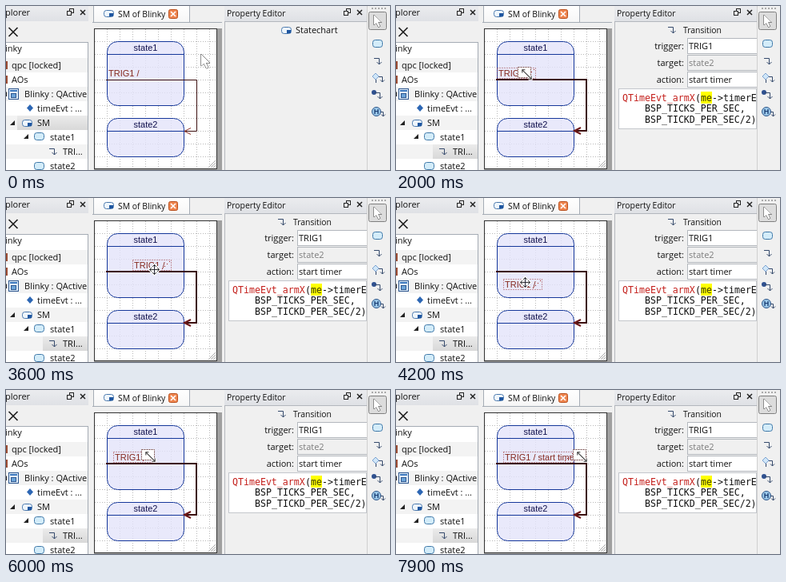
An HTML page with a canvas for the animation above (8 s loop, 480x205 px).

```html
<!DOCTYPE html>
<html lang="en">
<head>
<meta charset="utf-8">
<title>State machine editor</title>
<style>
html, body { margin: 0; width: 100%; height: 100%; overflow: hidden; background: #f0f0f0 }
canvas { display: block }
</style>
</head>
<body>
<canvas id="stage" width="480" height="205"></canvas>
<script>
const c = document.getElementById('stage').getContext('2d');
const UI = '11px "Open Sans", "Noto Sans", sans-serif';
const TITLE = '10.4px "Open Sans", "Noto Sans", sans-serif';
const ART = '11px "Liberation Sans", Arial, sans-serif';
const CODE = '11.6px "DejaVu Sans Mono", monospace';
const INK = '#111', WINE = '#3c1010', NAVY = '#16389a';
const CLICK = 8;

// cursor: [tick, x, y, shape from here on]; one tick is 100 ms
const cursorKeys = [
  [0, 244, 60, 'arrow'], [7, 238, 102, 'arrow'], [14, 238, 102, 'arrow'],
  [19, 177, 79, 'arrow'], [20, 161, 84, 'size'], [22, 152, 84, 'move'],
  [23, 147, 84, 'move'], [24, 153, 84, 'move'], [25, 148, 84, 'move'],
  [30, 148, 84, 'move'], [34, 185, 77, 'move'], [38, 185, 100, 'move'],
  [39, 185, 108, 'move'], [42, 161, 105, 'move'], [45, 156, 85, 'move'],
  [52, 156, 85, 'move'], [53, 191, 92, 'split'], [55, 191, 92, 'split'],
  [58, 173, 84, 'size'], [60, 178, 82, 'size'], [64, 178, 82, 'size'],
  [69, 194, 82, 'size'], [72, 212, 82, 'size'], [73, 212, 82, 'size'],
  [76, 217, 82, 'size'], [77, 217, 82, 'size'], [79, 230, 82, 'size']
];
// label: [tick, columns, rows, extra width] in steps of 8 pixels
const labelKeys = [
  [0, 0, 0, 0], [30, 0, 0, 0], [31, 1, -1, 0], [34, 4, -1, 0], [35, 4, -1, 0],
  [38, 4, 2, 0], [39, 4, 3, 0], [42, 1, 3, 0], [45, 1, 0, 0], [64, 1, 0, 0],
  [69, 1, 0, 2], [72, 1, 0, 4], [78, 1, 0, 4], [79, 1, 0, 5]
];

function sample(keys, k) {
  let i = keys.length - 1;
  while (keys[i][0] > k) i--;
  const a = keys[i], b = keys[i + 1] || a;
  const p = b === a ? 0 : (k - a[0]) / (b[0] - a[0]);
  return a.slice(1).map((v, j) => typeof v === 'string' ? v : Math.round(v + (b[j + 1] - v) * p));
}

function box(x, y, w, h, fill) {
  c.fillStyle = fill;
  c.fillRect(x, y, w, h);
}

function frame(x, y, w, h, stroke, fill) {
  if (fill) box(x, y, w, h, fill);
  c.strokeStyle = stroke;
  c.lineWidth = 1;
  c.strokeRect(x + .5, y + .5, w - 1, h - 1);
}

function line(points, stroke, width = 1) {
  c.beginPath();
  for (let i = 0; i < points.length; i += 2) c.lineTo(points[i], points[i + 1]);
  c.strokeStyle = stroke;
  c.lineWidth = width;
  c.stroke();
}

function poly(points, fill, stroke) {
  c.beginPath();
  for (let i = 0; i < points.length; i += 2) c.lineTo(points[i], points[i + 1]);
  c.closePath();
  if (stroke) { c.strokeStyle = stroke; c.lineWidth = 1; c.stroke(); }
  c.fillStyle = fill;
  c.fill();
}

function round(x, y, w, h, r, fill, stroke) {
  c.beginPath();
  c.roundRect(x + .5, y + .5, w, h, r);
  c.fillStyle = fill;
  c.fill();
  c.strokeStyle = stroke;
  c.lineWidth = 1;
  c.stroke();
}

function dot(x, y, r, fill) {
  c.beginPath();
  c.arc(x, y, r, 0, 7);
  c.fillStyle = fill;
  c.fill();
}

// y is the baseline
function text(s, x, y, font = UI, fill = INK, align = 'left') {
  c.font = font;
  c.fillStyle = fill;
  c.textAlign = align;
  c.fillText(s, x, y);
}

function gradient(x, y, w, h, top, bottom) {
  const g = c.createLinearGradient(0, y, 0, y + h);
  g.addColorStop(0, top);
  g.addColorStop(1, bottom);
  box(x, y, w, h, g);
}

function pill(x, y) { round(x - 6, y - 5, 12, 9, 3, '#d3ecf9', '#3f78a8'); }

function chartIcon(x, y) {
  round(x - 6, y - 5, 12, 8, 3, '#eef6fd', '#4a78ad');
  box(x + 1, y - 1, 5, 4, '#1f56a0');
}

function transIcon(x, y) {
  line([x - 5, y - 3.5, x + 1.5, y - 3.5, x + 1.5, y + 4], '#34496b');
  line([x - 1.5, y + 1, x + 1.5, y + 4, x + 4.5, y + 1], '#34496b');
}

function openMark(x, y) { poly([x + 3, y - 3, x + 3, y + 3, x - 3, y + 3], '#222'); }

function cross(x, y, r, stroke, width) {
  line([x - r, y - r, x + r, y + r], stroke, width);
  line([x + r, y - r, x - r, y + r], stroke, width);
}

function arrow(x, y) {
  poly([x, y, x, y + 15, x + 3.5, y + 12, x + 6.5, y + 18, x + 9, y + 17,
    x + 6, y + 11, x + 11, y + 11], '#fff', '#222');
}

// title bar of a dock panel; x is the centre of its close button
function dockBar(left, right, x) {
  gradient(left, 0, right - left, 19, '#ebecef', '#dfe1e5');
  frame(x - 17, 3, 6, 6, '#222');
  frame(x - 20, 6, 6, 6, '#222', '#e6e7ea');
  cross(x, 8, 3, '#222', 1.5);
}

function explorer(selected) {
  dockBar(0, 103, 96);
  text('plorer', -1, 12);
  cross(9, 32.5, 5.5, '#222', 1.7);
  frame(-1, 45, 104, 161, '#a5acb5', '#fff');
  for (let y = 65; y < 205; y += 36) box(0, y, 102, 18, '#f3f3f3');
  const [x, y] = selected ? [46, 173] : [14, 137];
  gradient(x, y, 102 - x, 18, '#ebebeb', '#d8d8d8');
  text('inky', -1, 57);
  box(0, 69, 2, 10, '#9a4a32');
  text('qpc [locked]', 7, 78);
  box(0, 87, 2, 10, '#9a4a32');
  text('AOs', 7, 96);
  openMark(-2, 110);
  frame(3, 103, 13, 14, '#2d568f', '#e2effb');
  box(5, 105, 9, 2, '#3c77bd');
  frame(6, 109, 7, 6, '#2d568f', '#6da4d8');
  text('Blinky : QActive', 23, 114);
  poly([30, 123, 34, 127.5, 30, 132, 26, 127.5], '#2d67b4');
  text('timeEvt : ...', 39, 132);
  openMark(8, 146);
  chartIcon(26, 147);
  text('SM', 39, 150);
  openMark(25, 163);
  pill(41, 163);
  text('state1', 55, 168);
  transIcon(59, 182);
  text('TRI...', 71, 186);
  pill(41, 200);
  text('state2', 55, 204);
}

function state(y, h, name) {
  round(126, y, 96, h, 13, 'rgba(228,228,251,.8)', NAVY);
  line([126, y + 16.5, 223, y + 16.5], NAVY);
  text(name, 174.5, y + 12, ART, '#10104c', 'center');
}

function label(k) {
  const [col, row, extra] = sample(labelKeys, k);
  const x = 126 + col * 8, y = 77 + row * 8, w = 49 + extra * 8;
  c.save();
  if (k >= CLICK) {
    c.setLineDash([1, 2]);
    frame(x, y, w, 14, '#a04040');
    c.setLineDash([]);
    for (let i = 0; i < 4; i++) box(x + w - 3 - i * 3, y + 2 + i * 3, 1, 1, '#a02020');
    c.beginPath();
    c.rect(x, y, w, 16);
    c.clip();
  }
  text(k < 65 ? 'TRIG1 /' : 'TRIG1 / start timer', x + 2, y + 11, ART, '#862a1e');
  c.restore();
}

function grid() {
  c.setLineDash([1, 2]);
  for (let x = 126.5; x < 262; x += 16) line([x, 29, x, 203], '#b8b8b8');
  for (let y = 44.5; y < 203; y += 16) line([111, y, 262, y], '#b8b8b8');
  c.setLineDash([]);
}

function diagram(k, hover) {
  const selected = k >= CLICK;
  gradient(110, 0, 119, 20, '#fff', '#f6f6f6');
  line([109.5, 20, 109.5, 0], '#a5acb5');
  line([229.5, 0, 229.5, 20], '#a5acb5');
  chartIcon(128, 10);
  text('SM of Blinky', 140, 14, TITLE);
  round(203, 4, 11, 11, 2, '#ef8650', '#b9501f');
  cross(209, 10, 3, '#fff', 1.6);
  box(108, 20, 162, 185, '#f0f0f0');
  line([108, 20.5, 270, 20.5], '#a5acb5');
  box(264, 28, 6, 177, '#a0a0a0');
  box(110, 204, 160, 1, '#a0a0a0');
  frame(110, 28, 154, 176, '#333', '#fff');
  grid();
  for (let i = 0; i < 3; i++) line([253 + i * 3, 202, 262, 193 + i * 3], '#aaa');
  state(44, 80, 'state1');
  state(140, 48, 'state2');
  const w = selected ? 2 : 1, o = selected ? 0 : .5;
  const ink = hover ? '#86141a' : WINE;
  line([125, 92 + o, 238 + o, 92 + o, 238 + o, 156 + o, 223, 156 + o], ink, w);
  line([231, 152 + o, 223, 156 + o, 231, 160 + o], selected ? '#6c1616' : '#8a2a20', w);
  label(k);
}

function field(y, name, value, off) {
  const ink = off ? '#7c7c7c' : INK;
  text(name, 360, y + 4, UI, INK, 'right');
  frame(364, y - 10, 88, 20, '#b3b7bd', off ? '#f0f0f0' : '#fff');
  text(value, 366, y + 4, UI, ink);
}

function properties(selected) {
  dockBar(273, 453, 442);
  text('Property Editor', 276, 13, TITLE);
  frame(273, 19, 182, 190, '#b3b7bd', '#f0f0f0');
  if (!selected) {
    chartIcon(350, 31);
    text('Statechart', 362, 34);
    return;
  }
  transIcon(345, 30);
  text('Transition', 359, 34, TITLE);
  field(50, 'trigger:', 'TRIG1');
  field(71, 'target:', 'state2', true);
  field(92, 'action:', 'start timer');
  frame(278, 103, 173, 51, '#c4c7cc', '#fff');
  box(381, 107, 14, 15, '#ffff00');
  text('QTimeEvt_armX', 283, 119, CODE, '#c4201c');
  text('(', 374, 119, CODE);
  text('me', 381, 119, CODE, '#3a3a00');
  text('->timerE', 395, 119, CODE);
  text('BSP_TICKS_PER_SEC,', 311, 132, CODE);
  text('BSP_TICKD_PER_SEC/2)', 311, 146, CODE);
}

function toolbar() {
  box(451, 0, 29, 205, '#f0f0f0');
  line([451.5, 0, 451.5, 205], '#d0d0d0');
  for (let x = 457; x < 474; x += 4) box(x, 2, 2, 2, '#aaa');
  round(453, 7, 22, 22, 2, '#dcdcdc', '#808080');
  c.save();
  c.translate(460, 11);
  c.scale(.85, .85);
  arrow(0, 0);
  c.restore();
  pill(464, 47);
  transIcon(465, 69);
  poly([462, 84, 466, 88, 462, 92, 458, 88], '#cfe6f8', '#2f62ad');
  line([466, 88.5, 470.5, 88.5, 470.5, 95, 468, 92.5], '#34496b');
  line([470.5, 95, 473, 92.5], '#34496b');
  line([462.5, 92, 462.5, 96], '#34496b');
  dot(460, 108, 3, '#2f5190');
  transIcon(466, 112);
  round(457, 126, 11, 11, 6, '#9cc9ea', '#2c5488');
  text('H', 463, 135, 'bold 9px "Liberation Sans", sans-serif', '#173a70', 'center');
  line([468, 132.5, 471.5, 132.5, 471.5, 138], '#34496b');
  line([469, 135.5, 471.5, 138, 474, 135.5], '#34496b');
}

// arrow with a head at both ends, n from centre to tip
function doubleArrow(n) {
  for (const [stroke, w] of [['#fff', 3], ['#333', 1]]) {
    line([0, -n, 0, n], stroke, w);
    line([-2.5, 2.5 - n, 0, -n, 2.5, 2.5 - n], stroke, w);
    line([-2.5, n - 2.5, 0, n, 2.5, n - 2.5], stroke, w);
  }
}

function cursor(x, y, shape) {
  if (shape === 'arrow') return arrow(x, y);
  c.save();
  if (shape === 'size') {
    c.setLineDash([2, 1]);
    frame(x - 9, y - 8, 17, 14, '#7a5050', '#fff');
    c.setLineDash([]);
  }
  c.translate(x + .5, y + .5);
  if (shape === 'move') {
    dot(0, 0, 6, '#fff');
    for (let i = 0; i < 2; i++) { doubleArrow(6); c.rotate(Math.PI / 2); }
    line([0, -6, 0, 6], '#223');
  } else if (shape === 'split') {
    doubleArrow(8);
    box(-8, -3, 16, 5, '#fff');
    line([-7, -2, 7, -2], '#333');
    line([-7, 1, 7, 1], '#333');
  } else {
    c.translate(2, 1);
    c.rotate(-Math.PI / 4);
    doubleArrow(8);
  }
  c.restore();
}

function draw(now) {
  const k = Math.floor(now % 8000 / 100), selected = k >= CLICK;
  const [x, y, shape] = sample(cursorKeys, k);
  box(0, 0, 480, 205, '#f0f0f0');
  explorer(selected);
  diagram(k, shape === 'split');
  properties(selected);
  toolbar();
  cursor(x, y, shape);
  requestAnimationFrame(draw);
}
requestAnimationFrame(draw);
</script>
</body>
</html>
```
